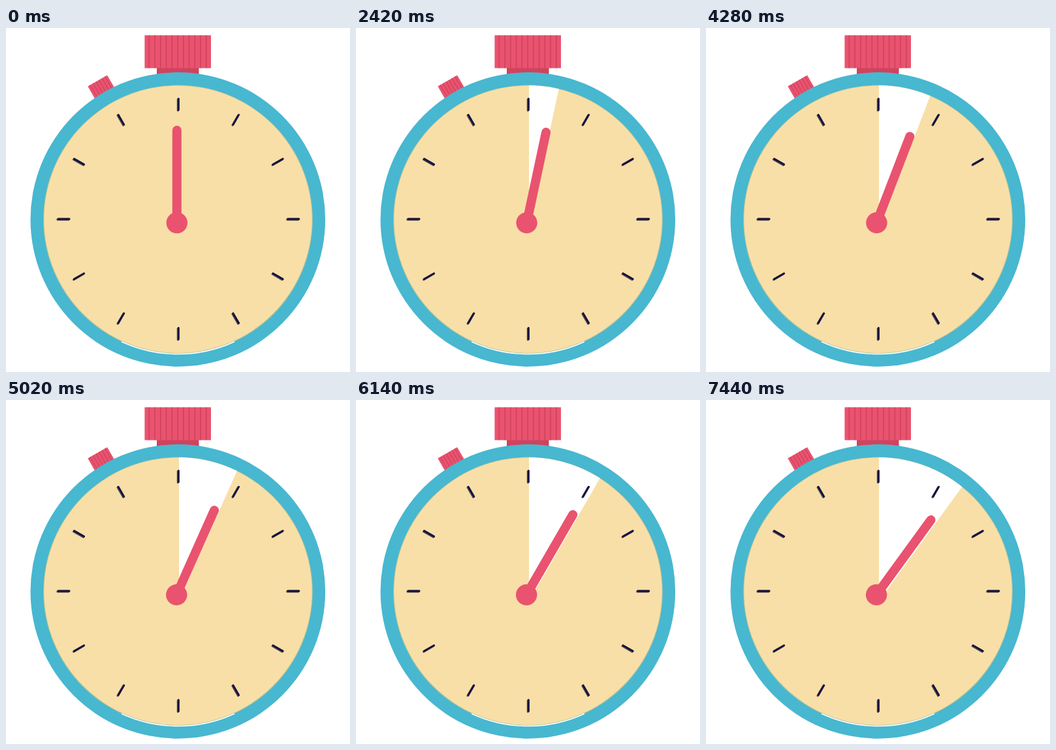
An HTML page that plays this animation: 527 px wide and 528 px high, repeating every 8 s.

```html
<!DOCTYPE html>
<html lang="en">
<head>
<meta charset="utf-8">
<title>Stopwatch</title>
<style>
html, body { margin: 0; width: 100%; height: 100%; overflow: hidden; background: #fff; }
svg { display: block; width: 100vw; height: 100vh; }
</style>
</head>
<body>
<svg viewBox="0 0 527 528" preserveAspectRatio="none">
  <defs>
    <clipPath id="dial"><circle cx="263.5" cy="294" r="206"/></clipPath>
  </defs>
  <g id="buttons" fill="#e9536f">
    <rect x="231" y="60" width="64.5" height="14" fill="#cf435d"/>
    <rect x="212.4" y="11.2" width="101.6" height="50.4"/>
    <path id="crownLines" stroke="#cf435d" stroke-width="1.6"/>
    <g transform="translate(125.3 89.6) rotate(-30)">
      <rect width="34.4" height="24"/>
      <path id="sideLines" stroke="#cf435d" stroke-width="1.3"/>
    </g>
  </g>
  <circle cx="263.3" cy="293.9" r="225.8" fill="#48b7d0"/>
  <circle cx="263.5" cy="294" r="206.4" fill="#a9c39d"/>
  <path d="M177 481.5A206.2 206.2 0 0 0 350 481.5" fill="none" stroke="#fff" stroke-width="1.4"/>
  <circle cx="263.5" cy="293.7" r="205.3" fill="#f8dfa7"/>
  <path id="wedge" fill="#fff" clip-path="url(#dial)"/>
  <g fill="none" stroke-width="3.1" stroke-linecap="round">
    <path id="tickShade" stroke="#5d5358" transform="translate(-.7 .8)"/>
    <path id="ticks" stroke="#17133f" transform="translate(.3 -.2)"/>
  </g>
  <g id="hand">
    <path d="M0 0V-142" stroke="#e9536f" stroke-width="14" stroke-linecap="round"/>
    <circle r="16.2" fill="#e9536f"/>
  </g>
</svg>
<script>
const LOOP = 8000;
const CYCLE = 1860;      // three uneven ticks per cycle
const STEP_DEG = 3;
const APEX = { x: 265, y: 308.5 };
const $ = id => document.getElementById(id);

function stripes(id, count, start, gap, top, bottom) {
  let d = '';
  for (let i = 0; i < count; i++) d += `M${start + i * gap} ${top}V${bottom}`;
  $(id).setAttribute('d', d);
}

function drawTicks() {
  let d = '';
  for (let i = 0; i < 12; i++) {
    const a = i * Math.PI / 6;
    const at = r => `${264 + r * Math.sin(a)} ${293.3 - r * Math.cos(a)}`;
    d += `M${at(167.3)}L${at(184.5)}`;
  }
  $('ticks').setAttribute('d', d);
  $('tickShade').setAttribute('d', d);
}

function stepAt(t) {
  const part = t % CYCLE;
  return Math.floor(t / CYCLE) * 3 + (part >= 560) + (part >= 1300);
}

function draw(t) {
  const step = stepAt(t);
  const deg = step * STEP_DEG;
  const reach = 320;
  const dx = reach * Math.tan(deg * Math.PI / 180);
  $('hand').setAttribute('transform', `translate(${261.8 - step * 0.06} 299) rotate(${deg})`);
  $('wedge').setAttribute('d', step ? `M${APEX.x} ${APEX.y}v${-reach}h${dx}z` : '');
}

stripes('crownLines', 11, 219.3, 8.75, 11.2, 61.6);
stripes('sideLines', 6, 4.2, 5.2, 0, 24);
drawTicks();

const begin = performance.now();
function frame() {
  draw((performance.now() - begin) % LOOP);
  requestAnimationFrame(frame);
}
frame();
</script>
</body>
</html>
```
